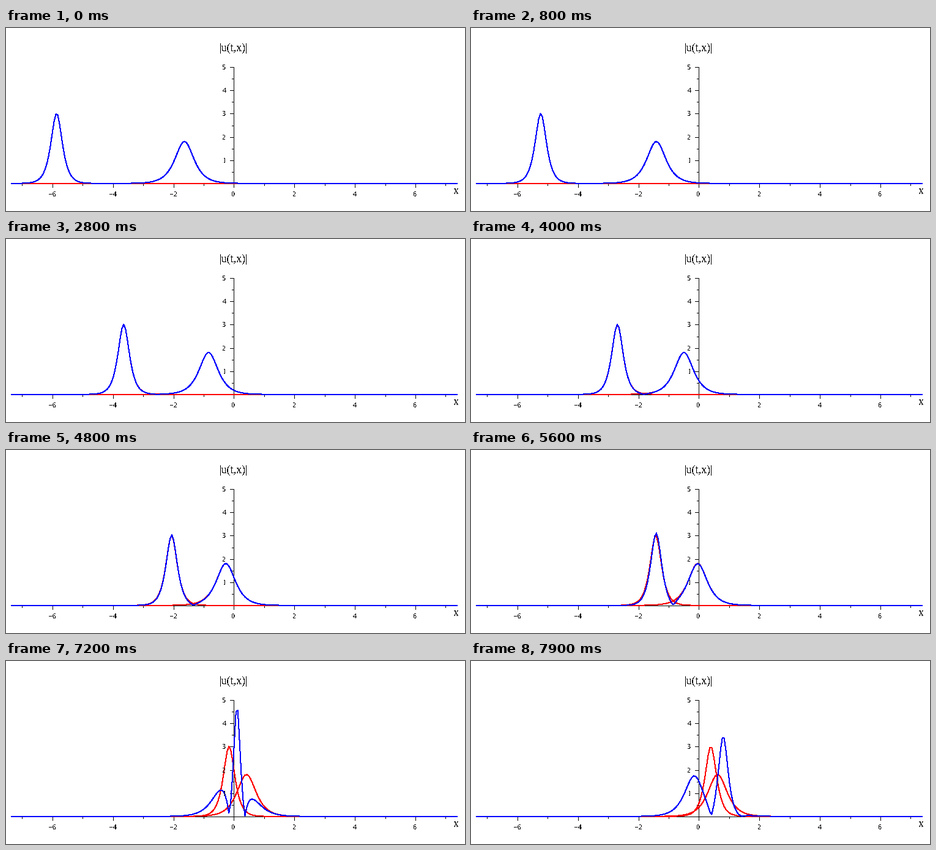
Animation of 750 by 300 pixels, one loop 8 s. Source, as a matplotlib script:

```python
import numpy as np
import matplotlib.pyplot as plt
from matplotlib.animation import FuncAnimation

W, H, DPI = 750, 300, 100
PX = 72 / DPI                      # one pixel in points
AXIS_X, AXIS_Y = 372.4, 255        # where the axes cross
ORIGIN_X, ORIGIN_Y = 372.9, 254.75  # zero of the curves
SX, SY = 49.42, 38.2               # pixels per unit
FRAMES, STEP = 80, 100
T0, DT = -0.1567, 0.0022

# Two mKdV solitons of opposite sign: amplitude k / 2, speed k ** 2
K1, K2 = 6.0, 3.6
R = (K1 + K2) / (K1 - K2)
XS = np.linspace(-7.37, 7.37, 251)

plt.rcParams["font.family"] = "Liberation Serif"
plt.rcParams["path.simplify"] = False

fig = plt.figure(figsize=(W / DPI, H / DPI), dpi=DPI, facecolor="white")
ax = fig.add_axes([0, 0, 1, 1])
ax.set_xlim(0, W)
ax.set_ylim(H, 0)
ax.axis("off")


def soliton(k, centre):
    return k / 2 / np.cosh(k * (XS - centre))


def collision(t):
    a = K1 * (XS - K1 ** 2 * t)
    b = K2 * (XS - K2 ** 2 * t)
    d, s = (a - b) / 2, (a + b) / 2
    dd, ds = (K1 - K2) / 2, (K1 + K2) / 2
    top = dd * np.cosh(d) * np.cosh(s) - ds * np.sinh(d) * np.sinh(s)
    return np.abs(R * top / (np.cosh(s) ** 2 + R ** 2 * np.sinh(d) ** 2))


def segment(x1, y1, x2, y2):
    ax.plot([x1, x2], [y1, y2], color="black", lw=PX, snap=True,
            solid_capstyle="projecting", zorder=1)


def label(x, y, text, size):
    ax.text(x, y, text, fontsize=size * PX, ha="center", va="baseline",
            antialiased=False, zorder=5)


def curve(color, z):
    # without antialiasing every touched pixel is filled: this shows as 2 px
    return ax.plot([], [], color=color, lw=PX, antialiased=False, snap=False,
                   solid_joinstyle="round", solid_capstyle="butt", zorder=z)[0]


def draw_axes():
    segment(8, AXIS_Y, 736, AXIS_Y)
    segment(AXIS_X, 64, AXIS_X, AXIS_Y)
    for n in range(-7, 8):
        x = AXIS_X + n * SX
        segment(x, AXIS_Y, x, AXIS_Y + (3 if n % 2 else 6))
        if n % 2 == 0:
            shift = -1 if n == 0 else 0
            label(x + shift, 276, str(n).replace("-", "\u2212"), 12)
    for n in range(1, 11):
        y = AXIS_Y - n * SY / 2
        segment(AXIS_X - (3 if n % 2 else 6), y, AXIS_X, y)
        if n % 2 == 0:
            label(356.5, y + 4, str(n // 2), 12)
    label(371.5, 38, "|u(t,x)|", 18)
    label(735, 272, "x", 18)


draw_axes()
fast, slow, both = curve("red", 2), curve("red", 2), curve("blue", 3)


def update(i):
    t = T0 + DT * i
    shift = np.log(R)
    shapes = (
        (fast, soliton(K1, K1 ** 2 * t - shift / K1)),
        (slow, soliton(K2, K2 ** 2 * t + shift / K2)),
        (both, collision(t)),
    )
    for line, u in shapes:
        line.set_data(ORIGIN_X + SX * XS, ORIGIN_Y - SY * u)
    return fast, slow, both


anim = FuncAnimation(fig, update, frames=FRAMES, interval=STEP,
                     repeat=True, repeat_delay=0, blit=False)
plt.show()
```
